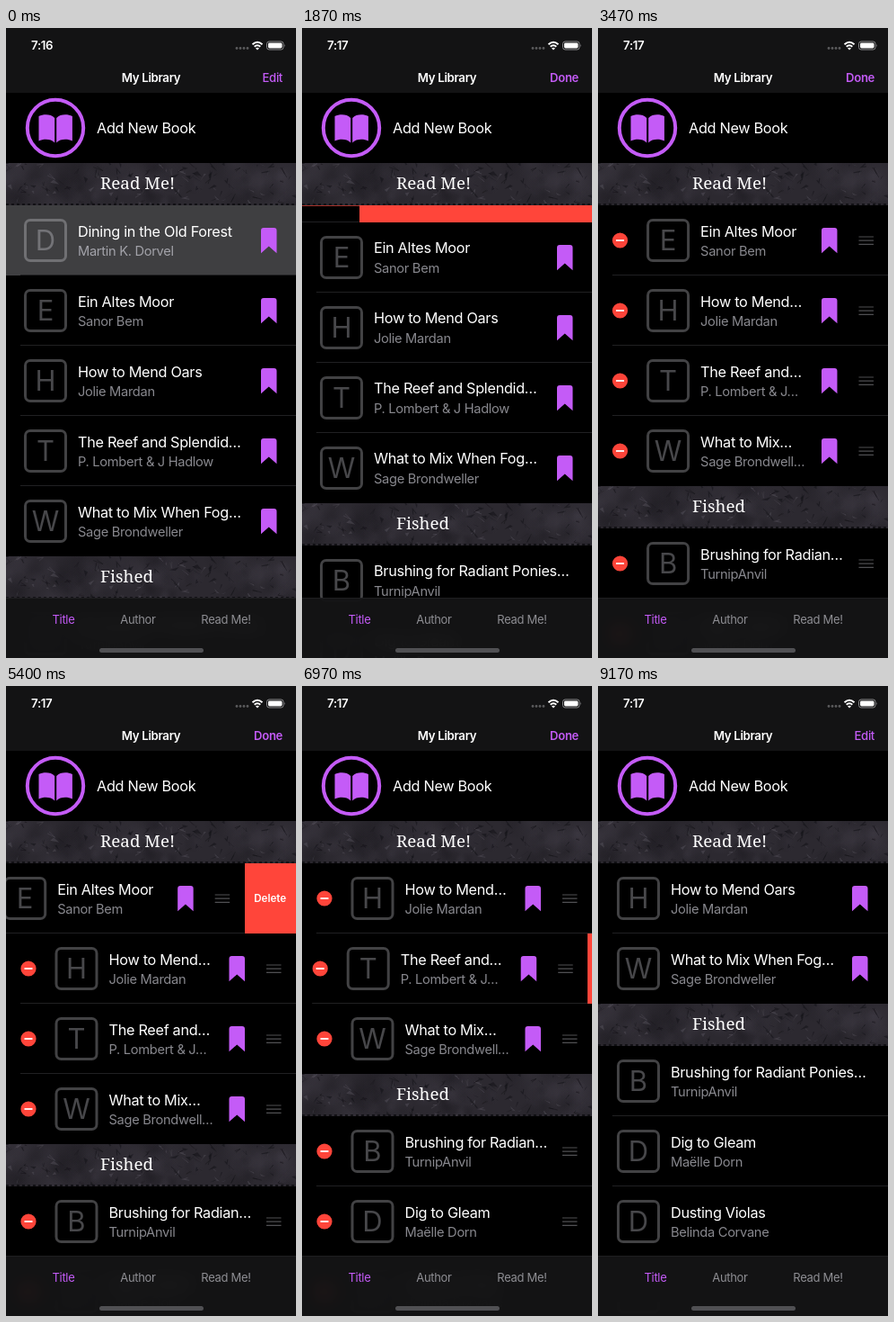
An HTML page with a canvas that plays this animation: 323x700 px, repeating every 9210 ms.

```html
<!DOCTYPE html>
<html lang="en">
<head>
<meta charset="utf-8">
<title>My Library</title>
<style>
  :root { --tint: #c45bf7; --red: #ff453a; --bar: #131314; }
  * { box-sizing: border-box; }
  html, body { margin: 0; width: 100%; height: 100%; overflow: hidden; background: #000; }
  body { position: relative; color: #fff; font: 16.3px/20px Inter, Roboto, sans-serif; letter-spacing: -.02em; white-space: nowrap; }
  svg, canvas { display: block; position: absolute; }
  .abs, nav, footer, main { position: absolute; }

  nav { inset: 0 0 auto; height: 72px; background: var(--bar); font-size: 13.3px; font-weight: 600; }
  #time { left: 28px; top: 9px; font-size: 13.3px; }
  #heading { left: 0; width: 323px; top: 45px; text-align: center; }
  #action { right: 15px; top: 45px; color: var(--tint); font-size: 13.1px; }

  main { inset: 72px 0 0; overflow: hidden; }
  .add { position: relative; height: 78px; }
  .add span { left: 101px; top: 29px; }
  h2 { position: relative; margin: 0; height: 47px; padding-left: 105px; font: 400 18.8px/45px "Noto Serif", "Liberation Serif", serif; letter-spacing: 0; }
  h2 canvas { left: 0; top: 0; }
  h2 span { position: relative; }

  .row { position: relative; height: 78px; overflow: hidden; background: #000; }
  .content { position: absolute; inset: 0; background: #000; }
  .row:not(:last-child) .content::after { content: ""; position: absolute; left: 16px; right: 0; bottom: 0; height: 1px; background: #202022; }
  .glow { position: absolute; inset: 0; background: #3f3f41; opacity: 0; }
  .lead, .mark, .grip, .minus { position: absolute; left: 0; top: 0; }
  .box { position: absolute; left: 20px; top: 15px; width: 48px; height: 48px; border: 3px solid rgba(235,235,245,.28); border-radius: 7px;
         color: rgba(235,235,245,.3); font-size: 31px; line-height: 42px; text-align: center; letter-spacing: 0; }
  .title, .author { position: absolute; left: 80px; top: 18.5px; }
  .author { top: 41px; font-size: 14.7px; color: rgba(235,235,245,.58); }
  .delete { position: absolute; top: 0; right: 0; height: 100%; background: var(--red); font-size: 11.6px; font-weight: 600; letter-spacing: 0; }
  .delete span { position: absolute; left: 0; top: 29px; width: 57px; text-align: center; }
  .closing .delete::before { content: ""; position: absolute; top: 0; right: 100%; width: 323px; height: 1px; background: #a5322b; }

  footer { left: 0; top: 633px; width: 323px; height: 67px; border-top: 1px solid #1f1f21; background: rgba(21,21,22,.92);
           backdrop-filter: blur(10px); font-size: 13px; color: #8e8e93; }
  footer span { position: absolute; top: 13px; transform: translateX(-50%); }
  footer i { position: absolute; left: 104px; top: 55px; width: 116px; height: 5px; border-radius: 3px; background: #505053; }
</style>
</head>
<body>
<main>
  <div class="add">
    <svg width="100" height="78" fill="#c45bf7">
      <circle cx="55" cy="39" r="31.2" fill="none" stroke="#c45bf7" stroke-width="4"/>
      <path id="page" d="M54.2 28C50 23.500 42 23.500 36.500 26V53.500C42 51 50 51 54.200 55.500Z"/>
      <use href="#page" transform="matrix(-1 0 0 1 110.400 0)"/>
    </svg>
    <span class="abs">Add New Book</span>
  </div>
  <h2><canvas width="323" height="47"></canvas><span>Read Me!</span></h2>
  <section id="unread"></section>
  <h2><canvas width="323" height="47"></canvas><span>Fished</span></h2>
  <section id="finished"></section>
</main>

<nav>
  <span id="time" class="abs"></span>
  <svg style="left:250px;top:10px" width="66" height="20" fill="#fff">
    <g fill="#5a5a5c"><circle cx="7" cy="12.500" r="1.400"/><circle cx="11" cy="12.500" r="1.400"/><circle cx="15" cy="12.500" r="1.400"/><circle cx="19" cy="12.500" r="1.400"/></g>
    <g fill="none" stroke="#fff" stroke-width="2"><path d="M24.500 8.200Q30 3.200 35.500 8.200M26.700 10.800Q30 7.800 33.300 10.800"/></g>
    <path d="M28 12.500Q30 10.800 32 12.500L30 14.500Z"/>
    <rect x="40.500" y="5" width="18.500" height="9" rx="2.600" fill="none" stroke="#8a8a8c"/>
    <rect x="42" y="6.500" width="15.500" height="6" rx="1.400"/>
    <path d="M60.300 8Q61.600 9.500 60.300 11Z" fill="#8a8a8c"/>
  </svg>
  <span id="heading" class="abs">My Library</span>
  <span id="action" class="abs"></span>
</nav>

<footer>
  <span style="left:64px;color:var(--tint)">Title</span>
  <span style="left:147px">Author</span>
  <span style="left:245px">Read Me!</span>
  <i></i>
</footer>

<script>
const LOOP = 9210, WIDTH = 323, ROW = 78, BUTTON = 57.5, INDENT = 34.5;

// open / close: when the Delete button slides in, and when the row collapses
const unread = [
  { title: 'Dining in the Old Forest', author: 'Martin K. Dorvel', open: 210, openRate: .008, close: 1735 },
  { title: 'Ein Altes Moor', author: 'Sanor Bem', open: 4836, close: 5825 },
  { title: 'How to Mend Oars', brief: 'How to Mend…', author: 'Jolie Mardan' },
  { title: 'The Reef and Splendid…', brief: 'The Reef and…', author: 'P. Lombert & J Hadlow', briefAuthor: 'P. Lombert & J…', open: 6936, close: 7879 },
  { title: 'What to Mix When Fog…', brief: 'What to Mix…', author: 'Sage Brondweller', briefAuthor: 'Sage Brondwell…' },
];
const finished = [
  { title: 'Brushing for Radiant Ponies…', brief: 'Brushing for Radian…', author: 'TurnipAnvil' },
  { title: 'Dig to Gleam', author: 'Maëlle Dorn' },
  { title: 'Dusting Violas', author: 'Belinda Corvane' },
  { title: '', author: '' },
];

const bursts = [
  [180, 1070, 19], [1510, 1550, 2], [1780, 2170, 9], [2970, 2970, 1], [3180, 3470, 7], [4870, 5400, 11],
  [5870, 6220, 8], [6970, 7510, 11], [7930, 8280, 8], [8750, 8750, 1], [8930, 9170, 6],
];

function snap(t) {
  const burst = bursts.filter(b => b[0] <= t).pop();
  if (!burst) return 0;
  const [first, last, count] = burst;
  if (count === 1) return first;
  const step = (last - first) / (count - 1);
  return Math.min(last, first + Math.floor((t - first) / step + .2) * step);
}

// Critically damped spring from 0 to 1
function spring(t, start, rate = .0193) {
  const x = Math.max(0, t - start) * rate;
  return 1 - (1 + x) * Math.exp(-x);
}

const $ = id => document.getElementById(id);
const shift = (el, x) => { el.style.transform = `translateX(${x}px)`; };
const setText = (el, text) => { if (el.textContent !== text) el.textContent = text; };

function addRow(book, section, marked) {
  const el = document.createElement('div');
  el.className = 'row';
  el.innerHTML = `
    <div class="content">
      <div class="glow"></div>
      <svg class="minus" width="40" height="78"><circle cx="25" cy="39" r="8.600" fill="#ff453a"/><path d="M20.500 39h9" stroke="#fff" stroke-width="1.800"/></svg>
      <div class="lead"><div class="box">${book.title.charAt(0)}</div><div class="title"></div><div class="author"></div></div>
      ${marked ? '<svg class="mark" width="323" height="78"><path d="M284 28q0-3 3-3h11.500q3 0 3 3v25.300l-8.750-7.800-8.750 7.800z" fill="#c45bf7"/></svg>' : ''}
      <svg class="grip" width="323" height="78"><path d="M290 35h16.500m-16.500 4.200h16.500m-16.500 4.200h16.500" stroke="#505053" stroke-width="1.200"/></svg>
    </div>
    <div class="delete"><span>Delete</span></div>`;
  section.append(el);
  const part = name => el.querySelector('.' + name);
  return { book, el, content: part('content'), glow: part('glow'), minus: part('minus'), lead: part('lead'), mark: part('mark'),
           grip: part('grip'), title: part('title'), author: part('author'), button: part('delete') };
}

const rows = [
  ...unread.map(book => addRow(book, $('unread'), true)),
  ...finished.map(book => addRow(book, $('finished'), false)),
];

function drawRow(row, t, edit, editing) {
  const { book, el } = row;
  const opened = book.open ? spring(t, book.open, book.openRate || .014) : 0;
  const closed = book.close ? spring(t, book.close) : 0;
  const slide = opened * BUTTON + closed * (WIDTH - BUTTON);
  const height = ROW * (1 - closed);
  el.style.height = (height < .3 ? 0 : height) + 'px';
  el.classList.toggle('closing', closed > 0);
  shift(row.content, -slide);
  row.button.style.width = slide + 'px';
  shift(row.minus, (edit - 1) * INDENT);
  shift(row.lead, edit * INDENT);
  shift(row.grip, (1 - edit) * INDENT);
  row.minus.style.opacity = row.grip.style.opacity = edit;
  if (row.mark) shift(row.mark, -edit * 35.5);
  setText(row.title, editing && book.brief || book.title);
  setText(row.author, editing && book.briefAuthor || book.author);
}

function drawSlate(canvas) {
  const c = canvas.getContext('2d');
  let seed = 11;
  const rand = (lo, hi) => lo + (hi - lo) * ((seed = seed * 16807 % 2147483647) / 2147483647);
  c.fillStyle = '#2c2930';
  c.fillRect(0, 0, WIDTH, 47);
  for (let i = 0; i < 60; i++) {
    const x = rand(0, WIDTH), y = rand(0, 47), r = rand(6, 24);
    const tone = i % 2 ? '10,9,13' : '84,79,92';
    const g = c.createRadialGradient(x, y, 0, x, y, r);
    g.addColorStop(0, `rgba(${tone},.18)`);
    g.addColorStop(1, `rgba(${tone},0)`);
    c.fillStyle = g;
    c.fillRect(x - r, y - r, 2 * r, 2 * r);
  }
  // ragged flakes and scratches
  for (let i = 0; i < 130; i++) {
    const x = rand(0, WIDTH), y = rand(0, 47);
    c.fillStyle = c.strokeStyle = i % 3 ? 'rgba(14,13,17,.45)' : 'rgba(125,120,132,.25)';
    c.lineWidth = rand(.4, 1.2);
    c.beginPath();
    c.moveTo(x, y);
    c.lineTo(x + rand(-7, 7), y + rand(-7, 7));
    c.lineTo(x + rand(-5, 5), y + rand(-4, 4));
    i % 2 ? c.fill() : c.stroke();
  }
  c.strokeStyle = 'rgba(8,8,10,.7)';
  c.lineWidth = 2;
  c.setLineDash([3, 3]);
  c.beginPath();
  c.moveTo(0, 46);
  c.lineTo(WIDTH, 46);
  c.stroke();
}

function draw(time) {
  const t = snap(time % LOOP);
  const editing = t >= 3180 && t < 8930;
  const edit = spring(t, 3140) - spring(t, 8890);
  const done = editing || (t >= 270 && t < 2000);
  const pressed = t === 2970 || t === 8750;
  setText($('time'), t < 1510 ? '7:16' : '7:17');
  setText($('action'), done ? 'Done' : 'Edit');
  $('action').style.fontWeight = done ? 600 : 500;
  $('action').style.opacity = pressed ? .4 : 1;
  rows[0].glow.style.opacity = Math.max(0, 1 - Math.max(0, t - 150) / 150);
  rows.forEach(row => drawRow(row, t, edit, editing));
}

document.querySelectorAll('canvas').forEach(drawSlate);
const start = performance.now();
function tick() {
  draw(performance.now() - start);
  requestAnimationFrame(tick);
}
tick();
</script>
</body>
</html>
```
